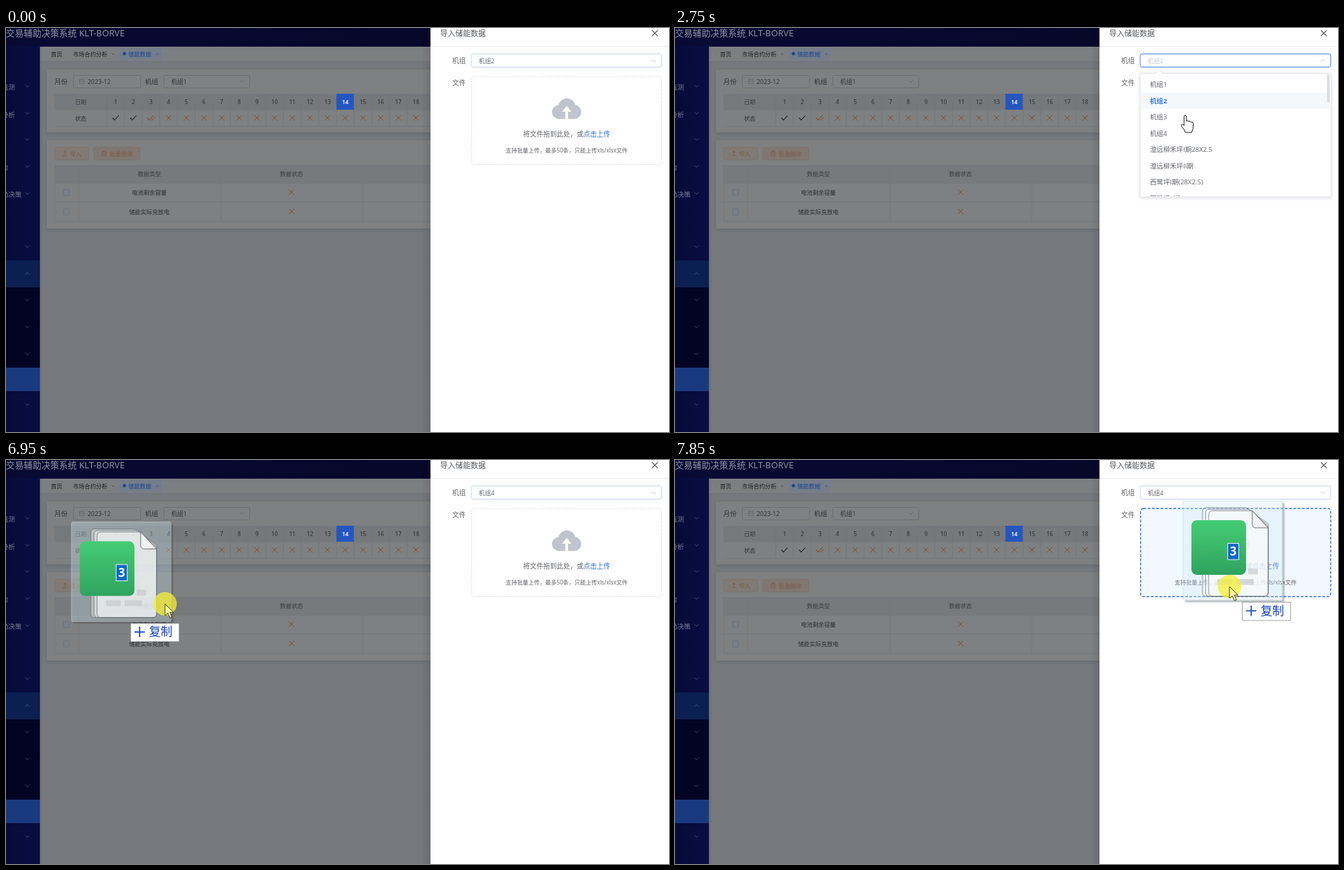
These frames come from a looping animation (959x584 px, 8000 ms). An HTML page:

```html
<!DOCTYPE html>
<html lang="zh-CN">
<head>
<meta charset="utf-8">
<title>导入储能数据</title>
<style>
html, body { margin: 0; width: 100%; height: 100%; overflow: hidden; background: #fff; }
svg { display: block; width: 100vw; height: 100vh; }
text { font-family: "Open Sans", "Noto Sans CJK SC", "Noto Sans CJK", sans-serif; white-space: pre; }
</style>
</head>
<body>
<svg id="stage" viewBox="0 0 959 584">
  <defs>
    <linearGradient id="header"><stop offset="0" stop-color="#080a34"/><stop offset="1" stop-color="#060729"/></linearGradient>
    <linearGradient id="side"><stop offset="0" stop-color="#060b39"/><stop offset="1" stop-color="#080e42"/></linearGradient>
    <linearGradient id="shade"><stop offset="0" stop-color="#000" stop-opacity="0"/><stop offset="1" stop-color="#000" stop-opacity=".1"/></linearGradient>
    <linearGradient id="glass" x2="1" y2="1"><stop offset="0" stop-color="#d2ecf4" stop-opacity=".36"/><stop offset="1" stop-color="#c8e2ec" stop-opacity=".26"/></linearGradient>
    <linearGradient id="green" x2="0" y2="1"><stop offset="0" stop-color="#45cc74"/><stop offset="1" stop-color="#2fa35f"/></linearGradient>
    <filter id="soft" x="-10%" y="-10%" width="120%" height="125%"><feDropShadow dx="0" dy="1.5" stdDeviation="2.5" flood-opacity=".14"/></filter>
    <filter id="blur" x="-10%" y="-10%" width="120%" height="120%"><feGaussianBlur stdDeviation="1"/></filter>
    <clipPath id="listClip"><rect x="673" y="66" width="276" height="177"/></clipPath>
  </defs>
</svg>
<script>
const LOOP = 8000, TICK = 70, TICK_OFFSET = 20;
const OPEN = 2060, PICK = 3320, BLUR = 5690, DRAG = 6860;
const RUST = '#804a32', BUTTON_INK = '#80573d';
const stage = document.getElementById('stage');

function el(parent, tag, attrs = {}) {
  const node = document.createElementNS('http://www.w3.org/2000/svg', tag);
  set(node, attrs);
  return parent.appendChild(node);
}
function set(node, attrs) {
  for (const key in attrs) node.setAttribute(key, attrs[key]);
}
const group = (p, attrs) => el(p, 'g', attrs);
const rect = (p, x, y, width, height, fill, more) => el(p, 'rect', { x, y, width, height, fill, ...more });
const stroke = (p, d, color, width = 1, more) =>
  el(p, 'path', { d, fill: 'none', stroke: color, 'stroke-width': width, ...more });
// y is the vertical middle of the text
function label(p, str, x, y, size, fill, more) {
  const node = el(p, 'text', { x, y: y + size * .37, 'font-size': size, fill, ...more });
  node.textContent = str;
  return node;
}
const mid = { 'text-anchor': 'middle' };
const cross = (p, x, y, r, color, w) =>
  stroke(p, `M${x - r} ${y - r}l${2 * r} ${2 * r}M${x + r} ${y - r}l${-2 * r} ${2 * r}`, color, w);
const tick = (p, x, y, color) => stroke(p, `M${x - 4.5} ${y}l3 3l6 -6.5`, color, 1.1);
const chevron = (p, x, y, color, up = 1, r = 3) =>
  stroke(p, `M${x - r} ${y - up * r / 2}l${r} ${up * r}l${r} ${-up * r}`, color, .9);

function drawSidebar() {
  const p = group(stage);
  rect(p, 0, 0, 614, 27, 'url(#header)');
  label(p, '交易辅助决策系统 KLT-BORVE', 0, 7.5, 12.8, '#9094a6');
  rect(p, 0, 26, 49, 558, 'url(#side)');
  rect(p, 0, 336, 49, 39, '#0b2050');
  rect(p, 0, 375, 49, 150, '#030424');
  rect(p, 0, 491, 49, 34, '#1a3a80');
  [['监测', 13, 85], ['分析', 13, 125], ['约', 3, 201], ['助决策', 22.5, 240]].forEach(([s, x, y]) =>
    label(p, s, x, y, 9.6, '#787d94', { 'text-anchor': 'end' }));
  [84, 123, 161, 200, 239, 316, 393, 432, 471, 544].forEach(y => chevron(p, 31, y, '#4b5278'));
  chevron(p, 31, 355, '#4b5f8c', -1);
}

function drawFilters(p) {
  rect(p, 59, 60, 570, 91, '#7e8081', { rx: 2, filter: 'url(#soft)' });
  label(p, '月份', 70, 77, 9.6, '#303133');
  label(p, '机组', 201, 77, 9.6, '#303133');
  const box = { rx: 2, stroke: '#6b7078' };
  rect(p, 97.5, 68.5, 97, 18, '#7f8182', box);
  rect(p, 228.5, 68.5, 124, 18, '#7f8182', box);
  stroke(p, 'M106.5 74.5h6.5v6h-6.5zM106.5 77h6.5M108 73.3v2M111.5 73.3v2', '#60646a', .8);
  label(p, '2023-12', 118, 77.5, 8.9, '#303133');
  label(p, '机组1', 239, 77.5, 8.7, '#303133');
  chevron(p, 341, 77, '#5c6066');

  rect(p, 70, 95, 544, 23, '#76797c');
  stroke(p, 'M70 118.5H614M70 142.5H614', '#777a7e');
  label(p, '日期', 108, 106.5, 8.4, '#3a3c40', { ...mid, 'font-weight': 500 });
  label(p, '状态', 108, 130.5, 8.4, '#303133', mid);
  for (let day = 1; day <= 18; day++) {
    const x = 158.5 + (day - 1) * 25.56, on = day === 14;
    stroke(p, `M${x - 12.8} 95V142`, '#747779', .8);
    if (on) rect(p, x - 12.8, 95, 25.6, 23, '#2456c0');
    label(p, day, x, 106.5, 8.2, on ? '#e3e8f2' : '#3a3c40', { ...mid, 'font-weight': on ? 700 : 600 });
    if (day < 3) tick(p, x, 130, '#1e1f22');
    else if (day > 3) cross(p, x, 130, 3.7, RUST, .9);
    else {
      tick(p, x - 1, 130, RUST);
      stroke(p, `M${x + .5} 132.2l1.2 1l3.8 -4.6`, RUST, .9);
    }
  }
}

function drawTable(p) {
  rect(p, 59, 162, 570, 128, '#7e8081', { rx: 2, filter: 'url(#soft)' });
  const edge = { rx: 2, stroke: '#806f64', 'stroke-width': .8 };
  rect(p, 70.5, 172.5, 49, 18, '#807a77', edge);
  rect(p, 127, 172.5, 66.5, 18, '#807773', edge);
  stroke(p, 'M82 184.5h6.5M85.2 183v-5M83 180l2.2 -2.2l2.2 2.2', BUTTON_INK, .9);
  label(p, '导入', 92.5, 181.7, 8.3, BUTTON_INK);
  stroke(p, 'M138.5 179h7M140.5 179v-1.3h3V179M139.3 179v5.8h5.4V179M141.2 181v2M142.8 181v2', BUTTON_INK, .8);
  label(p, '批量删除', 150, 181.7, 8.3, BUTTON_INK);

  rect(p, 70, 198, 544, 26, '#77797c');
  stroke(p, 'M70 224.5H614M70 251.5H614M70 279.5H614M70.5 198V279M105 198V279M311 198V279M516 198V279', '#757779', .8);
  label(p, '数据类型', 207.5, 211, 8.4, '#3a3c40', mid);
  label(p, '数据状态', 413, 211, 8.4, '#3a3c40', mid);
  ['电池剩余容量', '储能实际充放电'].forEach((name, i) => {
    const y = 237.5 + 28 * i;
    rect(p, 83.2, y - 4, 8.6, 8.6, '#7b8086', { rx: 1, stroke: '#686f7b', 'stroke-width': .8 });
    label(p, name, 207.3, y + .5, 8.4, '#2c2d30', mid);
    cross(p, 413, y - .3, 3.7, RUST, .9);
  });
}

function drawPage() {
  const p = group(stage), blue = '#1d4690';
  rect(p, 49, 27, 565, 557, '#75797e');
  rect(p, 49, 27, 565, 21.5, '#7c7f82');
  stroke(p, 'M49 48.5H614', '#6f7378');
  rect(p, 165, 29, 59.5, 17, '#747d8a', { rx: 1, stroke: '#717d90', 'stroke-width': .8 });
  label(p, '首页', 65, 37.5, 8.3, '#1f2023');
  label(p, '市场合约分析', 97, 37.5, 8.3, '#1f2023');
  cross(p, 155, 37.8, 1.5, '#55585c', .8);
  el(p, 'circle', { cx: 171.2, cy: 37.2, r: 2.4, fill: blue });
  label(p, '储能数据', 177, 37.5, 8.3, blue);
  cross(p, 219, 37.8, 1.5, '#4a618c', .8);
  drawFilters(p);
  drawTable(p);
  rect(p, 49, 27, 4, 557, 'url(#shade)', { transform: 'rotate(180 51 305.5)' });
  rect(p, 600, 0, 14, 584, 'url(#shade)');
}

function drawDrawer() {
  const p = group(stage), ui = {};
  rect(p, 614, 0, 345, 584, '#fff');
  stroke(p, 'M614 26.5H959', '#e9ebee');
  label(p, '导入储能数据', 628, 8, 11, '#55585d');
  cross(p, 938.5, 7.5, 4.2, '#44474c', 1.1);
  label(p, '机组', 645.5, 47, 9.7, '#606266');
  label(p, '文件', 645.5, 79, 9.7, '#606266');
  ui.select = rect(p, 673, 37.5, 275.5, 19, '#fff', { rx: 2 });
  ui.value = label(p, '', 684, 47.3, 8.7, '');
  ui.caret = chevron(p, 937, 47, '#c0c4cc', 1, 3.3);
  ui.zone = rect(p, 673.5, 70, 275, 127.5, '#fff', { rx: 4 });
  // cloud with an upward arrow
  el(p, 'path', {
    fill: '#c0c4cc',
    d: 'M800.5 131.5a10 10 0 0 1 -1.5 -20a12.5 12.5 0 0 1 24.3 -.3a10.2 10.2 0 0 1 -1.3 20.3z'
  });
  el(p, 'path', { fill: '#fff', d: 'M811 112.5l7 8.5h-5.2v10.8h-3.6V121H804z' });
  const line = label(p, '将文件拖到此处，或', 811, 153, 9.7, '#606266', mid);
  const link = el(line, 'tspan', { fill: '#2f66d8' });
  link.textContent = '点击上传';
  label(p, '支持批量上传，最多50条，只能上传xls/xlsx文件', 811, 177.3, 8.2, '#606266', mid);
  return ui;
}

function drawList() {
  const root = group(stage);
  el(root, 'path', {
    d: 'M675 65.5H695l5 -4.5l5 4.5H947a2 2 0 0 1 2 2V242a2 2 0 0 1 -2 2H675a2 2 0 0 1 -2 -2V67.5a2 2 0 0 1 2 -2z',
    fill: '#fff', stroke: '#e1e4ea', filter: 'url(#soft)'
  });
  const body = group(root, { 'clip-path': 'url(#listClip)' });
  const hover = rect(body, 673.5, 0, 275, 23.55, '#f5f7fa');
  const rows = ['机组1', '机组2', '机组3', '机组4', '澄远柳禾坪I期28X2.5', '澄远柳禾坪II期',
    '西鹭坪I期(28X2.5)', '西鹭坪II期(28X2.5)'].map((s, i) => label(body, s, 687, 81.5 + i * 23.5, 9.6, '#606266'));
  rect(body, 943, 67, 4, 41, '#dddfe3', { rx: 2 });
  return { root, hover, rows };
}

function drawCargo() {
  const p = group(stage);
  stroke(p, 'M3 145H145V3', '#000', 2, { opacity: .4, filter: 'url(#blur)' });
  rect(p, 0, 0, 144, 144, 'url(#glass)', { rx: 2, stroke: '#c3d6de', 'stroke-opacity': .6 });
  for (let i = 0; i < 3; i++) {
    const x = 28 + i * 4.5, y = 10 + i * 2.2;
    el(p, 'path', {
      d: `M${x + 5} ${y}H${91 + i * 4.5}L123 ${33 + i * 3}V133a5 5 0 0 1 -5 5H${x + 5}a5 5 0 0 1 -5 -5V${y + 5}a5 5 0 0 1 5 -5z`,
      fill: '#f8fafa', 'fill-opacity': .38, stroke: '#62676a', 'stroke-opacity': .75, 'stroke-width': .9
    });
  }
  el(p, 'path', { d: 'M100 14.5V34a5 5 0 0 0 5 5H123z', fill: '#eef0f1', stroke: '#62676a', 'stroke-width': .9 });
  [[50, 113, 21], [77, 113, 25], [94, 98, 14]].forEach(([x, y, w]) => rect(p, x, y, w, 8.5, '#c3c7ca', { opacity: .6 }));
  rect(p, 12, 28, 79, 79, 'url(#green)', { rx: 8 });
  rect(p, 64.5, 61.5, 16, 23.5, '#0b69c7', { stroke: '#e8f2fa' });
  label(p, '3', 72.5, 73, 17, '#fff', { ...mid, 'font-weight': 700 });
  return p;
}

function drawTip() {
  const p = group(stage);
  rect(p, .5, .5, 70, 26.5, '#fff', { stroke: '#8a8d90', 'stroke-width': .8 });
  stroke(p, 'M6 13h15M13.5 5.5v15', '#0f3fb8', 1.7);
  label(p, '复制', 27, 12.6, 17, '#0f3fb8', { 'font-weight': 300 });
  return p;
}

// Pointer tip at each time: [ms, x, y]
const track = [
  [0, 950, 600], [300, 950, 600], [310, 944, 578], [600, 860, 420], [850, 762, 290], [1100, 722, 200],
  [1150, 752, 160], [1210, 787, 125], [1370, 787, 125], [1650, 782, 90], [1920, 760, 52], [2050, 757, 49],
  [2320, 757, 49], [2750, 738, 126], [3000, 737, 150], [3440, 737, 152], [3870, 777, 152], [4200, 800, 148],
  [4340, 803, 147], [4750, 803, 147], [4780, 620, 180], [4850, 171, 217], [4920, -60, 235], [6800, -60, 235],
  [6880, 90, 220], [6950, 230, 208], [7020, 365, 198], [7090, 475, 193], [7160, 568, 191], [7230, 640, 189],
  [7300, 695, 187], [7440, 765, 185], [7580, 797, 184], [7770, 802, 183], [LOOP, 802, 183]
];

function slope(i, k) {
  const a = track[i - 1], b = track[i], c = track[i + 1];
  if (!a || !c) return 0;
  const d0 = (b[k] - a[k]) / (b[0] - a[0]), d1 = (c[k] - b[k]) / (c[0] - b[0]);
  return d0 * d1 <= 0 ? 0 : 2 * d0 * d1 / (d0 + d1);
}
// Monotone cubic through the track
function pointer(t) {
  const i = Math.max(0, track.findIndex(p => p[0] > t) - 1);
  const a = track[i], b = track[i + 1], span = b[0] - a[0], u = (t - a[0]) / span, v = 1 - u;
  return [1, 2].map(k =>
    v * v * (1 + 2 * u) * a[k] + u * u * (3 - 2 * u) * b[k] +
    span * u * v * (v * slope(i, k) - u * slope(i + 1, k)));
}

drawSidebar();
drawPage();
const ui = drawDrawer();
const list = drawList();
const cargo = drawCargo();
const glow = el(stage, 'circle', { r: 17, fill: '#f6ef38', opacity: .76 });
const tip = drawTip();
const ink = { fill: '#fff', stroke: '#1a1a1a', 'stroke-width': 1, 'stroke-linejoin': 'round' };
const arrow = el(stage, 'path', { d: 'M0 0V17l4 -3.7l3.2 7.2l3 -1.3L7 12.2h5.3z', ...ink });
const hand = el(stage, 'path', {
  d: 'M-1.7 15V1.5Q0 -1.2 1.8 1.5V8.5Q3.6 6.8 5 9Q7 7.6 8.2 10Q11 9 11.6 12V17Q11.5 20 9.2 25H.3Q-1 21 -5 16.5Q-6.5 12.5 -3.8 13Z',
  ...ink
});

const clamp = x => Math.min(1, Math.max(0, x));
const ease = x => 1 - (1 - clamp(x)) ** 2;
const show = (node, on) => node.setAttribute('display', on ? 'inline' : 'none');
const move = (node, x, y) => node.setAttribute('transform', `translate(${x} ${y})`);

function render(time) {
  const t = Math.max(0, Math.floor((time - TICK_OFFSET) / TICK) * TICK + TICK_OFFSET);
  const [x, y] = pointer(t);
  const drag = t >= DRAG, open = t >= OPEN && t < PICK;
  const listShown = t >= OPEN && t < PICK + 220;
  const inside = x > 673 && x < 949 && y > 70 && y < 198;
  const over = inside && !listShown;
  const onSelect = x > 673 && x < 949 && y > 37 && y < 58;

  set(ui.select, { stroke: t >= OPEN && t < BLUR ? '#4285e8' : '#c6d5ec' });
  ui.value.textContent = t < PICK ? '机组2' : '机组4';
  set(ui.value, { fill: open ? '#c0c4cc' : '#606266' });
  const turn = 180 * (ease((t - OPEN) / 300) - ease((t - PICK - 80) / 300));
  set(ui.caret, { transform: `rotate(${turn} 937 47)` });
  set(ui.zone, {
    fill: over && drag ? '#f1f8ff' : '#fff',
    stroke: over ? (drag ? '#3a6fe0' : '#4d86e6') : '#dcdee2',
    'stroke-width': over && drag ? 1.4 : 1,
    'stroke-dasharray': over && drag ? '4 2.2' : '2.2 1.6'
  });

  show(list.root, listShown);
  if (listShown) {
    const grow = Math.min(ease((t - OPEN + TICK) / 300), 1 - ease((t - PICK) / 220));
    set(list.root, { opacity: grow, transform: `translate(0 ${65 * (1 - grow)}) scale(1 ${grow})` });
    const hovered = t <= 2750 ? 1 : Math.min(3, Math.max(2, Math.floor((y - 69.8) / 23.5)));
    list.hover.setAttribute('y', 69.8 + hovered * 23.5);
    const chosen = t < PICK ? 1 : 3;
    list.rows.forEach((row, i) =>
      set(row, { fill: i === chosen ? '#3b78e7' : '#606266', 'font-weight': i === chosen ? 700 : 400 }));
  }

  // the carried files trail slightly behind the pointer
  const [gx, gy] = pointer(Math.max(0, t - 34));
  move(cargo, gx - 67, gy - 124);
  move(tip, gx + 18, gy + 22);
  show(cargo, drag);
  show(tip, drag);

  const pressed = [OPEN, PICK].some(c => t >= c - 70 && t < c + 70);
  show(glow, drag || pressed);
  move(glow, x, y);
  const pointing = !drag && (inside || onSelect);
  show(hand, pointing);
  show(arrow, !pointing);
  move(hand, x, y);
  move(arrow, x, y);
  set(arrow, { fill: drag ? '#faf3a0' : '#fff', 'stroke-width': drag ? .8 : 1 });
}

const start = performance.now();
function frame() {
  render((performance.now() - start) % LOOP);
  requestAnimationFrame(frame);
}
frame();
</script>
</body>
</html>
```
